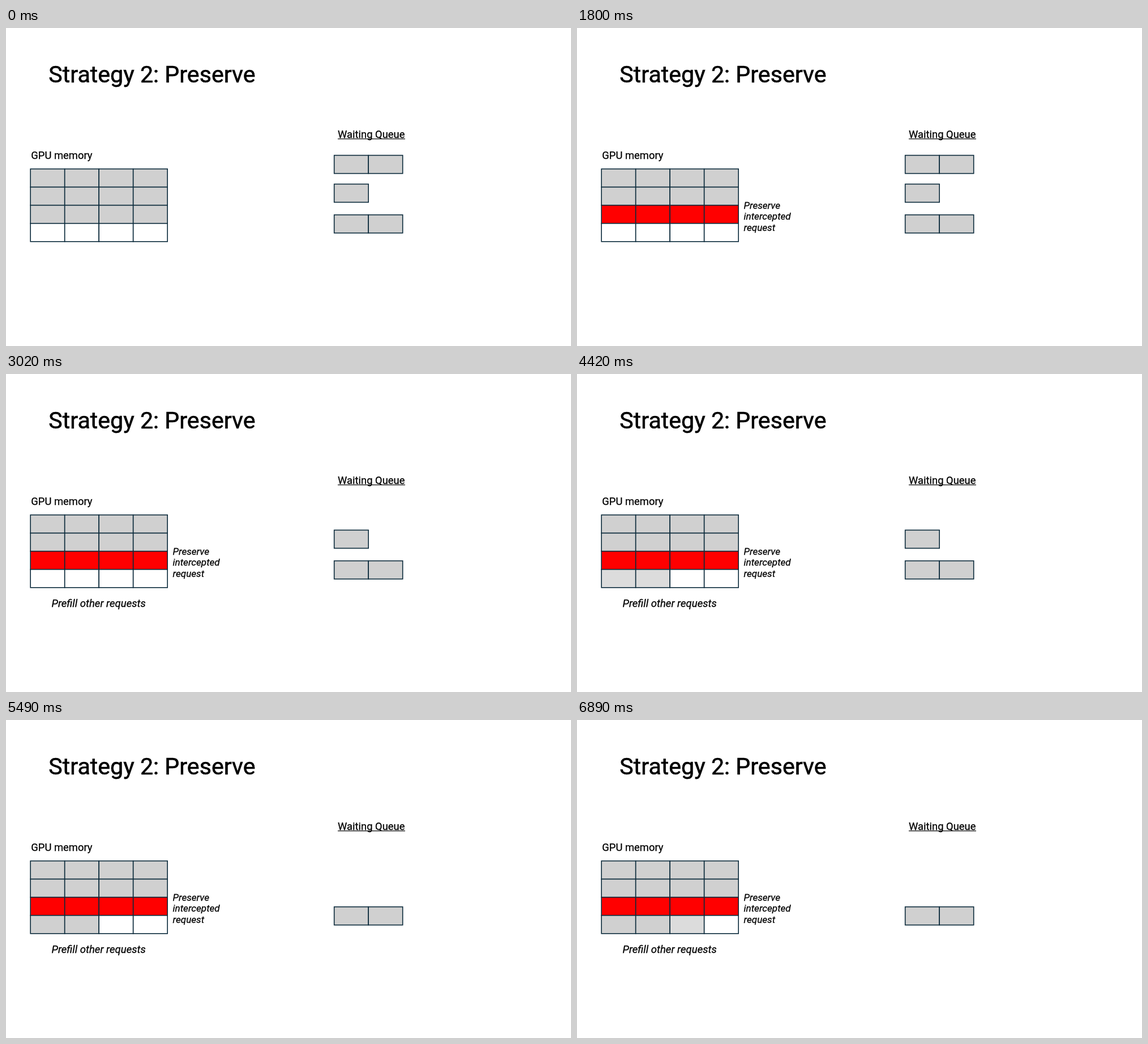
Write an HTML page that moves like this. It is 998 px wide and 561 px high and loops after 8 s.

```html
<!DOCTYPE html>
<html lang="en">
<head>
<meta charset="utf-8">
<title>Strategy 2: Preserve</title>
<style>
  html, body { margin: 0; width: 100%; height: 100%; overflow: hidden; background: #fff; }
  svg { display: block; width: 100%; height: 100%; }
  text { font-family: Roboto, Inter, sans-serif; fill: #000; stroke: #000; stroke-width: 0.015em; }
  .note { font-style: italic; }
</style>
</head>
<body>
<svg id="stage" viewBox="0 0 998 561"></svg>
<script>
const LOOP = 8000;
const CELL_W = 60.5, CELL_H = 32.05;
const GREY = '#d0d0d0', RED = '#ff0000', LINE = '#0b2a3b';
const stage = document.getElementById('stage');

function add(tag, attrs, content = '') {
  const el = document.createElementNS('http://www.w3.org/2000/svg', tag);
  for (const key in attrs) el.setAttribute(key, attrs[key]);
  el.textContent = content;
  return stage.appendChild(el);
}

function label(x, y, size, content, cls = '') {
  return add('text', { x, y, 'font-size': size, class: cls }, content);
}

function cells(x, y, count, fill) {
  return Array.from({ length: count }, (_, i) => add('rect', {
    x: x + i * CELL_W, y, width: CELL_W, height: CELL_H,
    fill, stroke: LINE, 'stroke-width': 1.6
  }));
}

label(75.3, 95.6, 41.2, 'Strategy 2: Preserve');
label(44.3, 231, 18.4, 'GPU memory');
label(586, 194, 18.4, 'Waiting Queue');
add('rect', { x: 586, y: 195, width: 119, height: 1.2 });

const memory = [0, 1, 2, 3].map(row =>
  cells(43.2, 248.6 + row * CELL_H, 4, row < 3 ? GREY : '#ffffff'));
const queue = [[224.6, 2], [275.4, 1], [329.6, 2]].map(([y, count]) =>
  cells(579.7, y, count, GREY));

const preserve = ['Preserve', 'intercepted', 'request'].map((word, i) =>
  label(294.5, 318.7 + i * 19.7, 17.1, word, 'note'));
const prefill = label(80.5, 411.3, 18.6, 'Prefill other requests', 'note');

function show(els, on) {
  for (const el of els) el.setAttribute('visibility', on ? 'visible' : 'hidden');
}

function paint(els, fill) {
  for (const el of els) el.setAttribute('fill', fill);
}

// Cells fill in visible steps rather than a smooth fade.
function stepFill(t, start, mid, end) {
  if (t < start) return '#ffffff';
  if (t < mid) return '#ededed';
  return t < end ? '#dcdcdc' : GREY;
}

function render(t) {
  paint(memory[2], t < 500 ? GREY : RED);
  show(preserve, t >= 1800);
  show([prefill], t >= 3020);
  show(queue[0], t < 3020);
  show(queue[1], t < 5490);
  paint(memory[3].slice(0, 2), stepFill(t, 3700, 4420, 5490));
  paint(memory[3].slice(2, 3), stepFill(t, 6170, 6890, LOOP));
}

const begin = performance.now();
function tick() {
  render((performance.now() - begin) % LOOP);
  requestAnimationFrame(tick);
}
tick();
</script>
</body>
</html>
```
